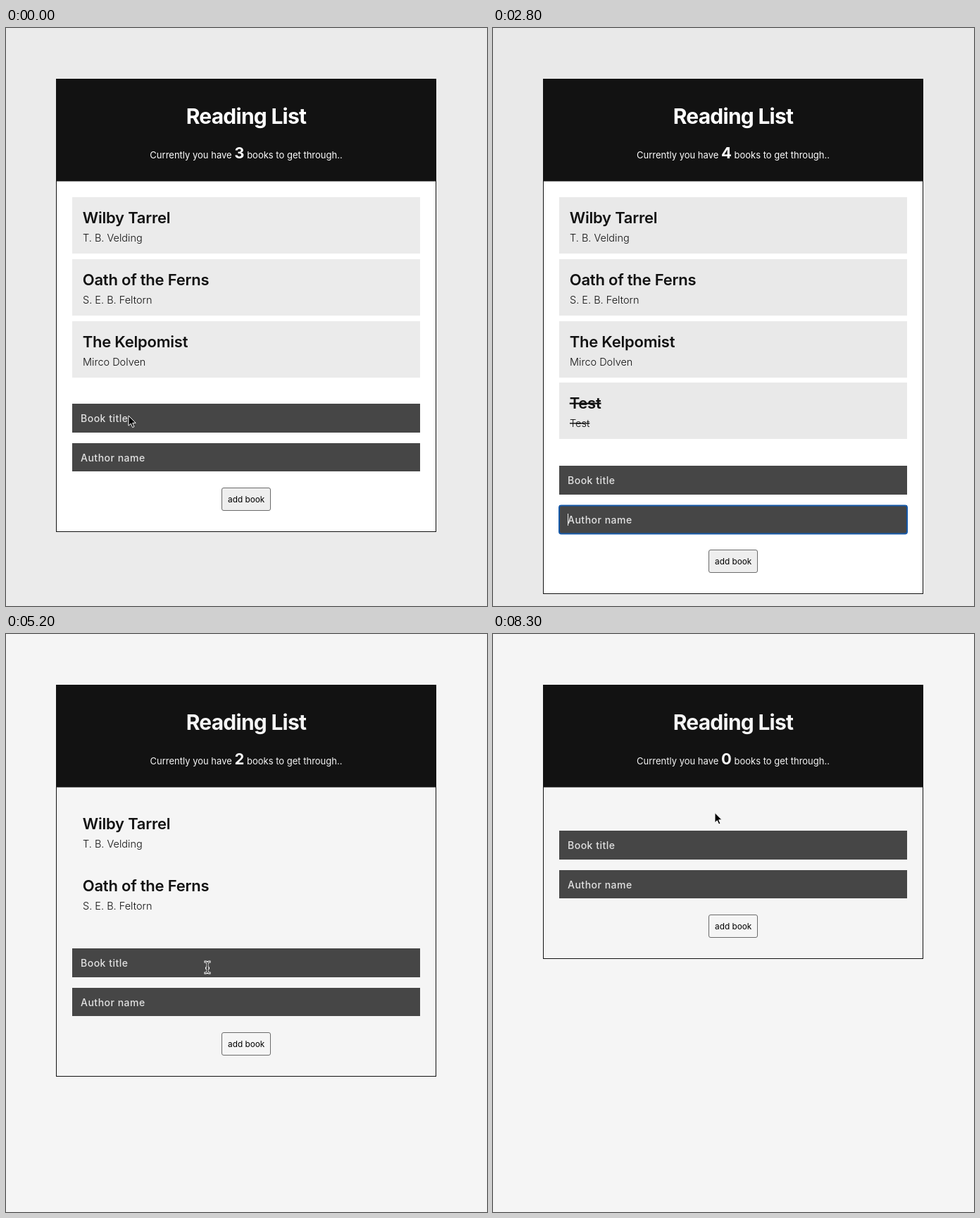
Animation of 683x820 px, one loop 8.4 s. Source, as an HTML page:

```html
<!DOCTYPE html>
<html lang="en">
<head>
<meta charset="utf-8">
<title>Reading List</title>
<style>
  html, body { margin: 0; width: 100%; height: 100%; overflow: hidden; }
  svg { display: block; width: 100%; height: 100%; font-family: Inter, "Liberation Sans", sans-serif; background: var(--page); }
  text { white-space: pre; }
  .paper { fill: var(--paper); stroke: #121212; }
  .head { fill: #121212; }
  .light { fill: var(--paper); text-anchor: middle; }
  .h1 { font-size: 30px; font-weight: 700; letter-spacing: -.75px; }
  .lead { font-size: 13px; }
  .count { font-size: 22px; font-weight: 700; }
  .card rect { fill: var(--page); }
  .title { font-size: 22px; font-weight: 600; letter-spacing: -.22px; fill: #111; }
  .author { font-size: 14.5px; font-weight: 300; fill: #111; }
  .hover text { text-decoration: line-through; }
  .field { fill: #464646; }
  .hint { font-size: 14px; font-weight: 500; letter-spacing: .5px; fill: #e2e2e2; }
  .typed { font-size: 14px; font-weight: 700; fill: #fff; }
  .focus { fill: none; stroke: #1659a8; stroke-width: 2; }
  .caret { fill: #eee; }
  .button { fill: var(--button); stroke: #6b6b6b; }
  .label { font-size: 11.8px; text-anchor: middle; }
  .ring { fill: none; stroke: #000; stroke-width: 2.6; }
</style>
</head>
<body>
<svg viewBox="0 0 683 820">
  <defs>
    <path id="bar" d="M-3-8Q0-8 0-6V6Q0 8-3 8M3-8Q0-8 0-6V6Q0 8 3 8M-1.5 1H1.5"/>
  </defs>
  <rect class="paper" id="box" x="71.5" y="72.5" width="539"/>
  <rect class="head" x="71" y="72" width="540" height="145.5"/>
  <text class="light h1" x="341" y="136">Reading List</text>
  <text class="light lead" x="341" y="184.5">Currently you have <tspan class="count" id="count">3</tspan> books to get through..</text>
  <g id="cards"></g>
  <g id="form">
    <rect class="field" x="94" width="494" height="41"/>
    <text id="in0" x="106" y="25.5"></text>
    <rect class="field" x="94" y="56" width="494" height="40"/>
    <text id="in1" x="106" y="81.5"></text>
    <rect class="focus" id="focus" x="94" width="494" height="40" rx="3"/>
    <rect class="caret" id="caret" width="1" height="17"/>
    <rect class="button" x="306.5" y="119.5" width="69" height="32" rx="2.5"/>
    <text class="label" x="341.2" y="139.5">add book</text>
  </g>
  <g id="pointer">
    <circle class="ring" id="ring" r="27"/>
    <path id="arrow" d="M0 0V14.2L3.3 11.2L5.7 16.6L8 15.6L5.7 10.3H10.2Z" stroke="#fff"/>
    <g id="beam" fill="none" stroke-linecap="square">
      <use href="#bar" stroke="#fff" stroke-width="3"/>
      <use href="#bar" stroke="#222"/>
    </g>
    <g id="hand" stroke="#000" stroke-linejoin="round">
      <path d="M-1 9L-3.6 6Q-4.2 4.3-2.4 4.6L-.7 6L-2.2 1Q-2.3-1-.8-.8Q.2-.6.5.8L1.5 4.2Q1.9 2.7 3.4 3.5L3.9 4.4Q4.7 3.1 5.9 4.4L6.3 5.1Q7.8 4.3 8.3 6L8.9 9.4Q9.2 11.8 8.3 14.6H1.6Q1 12 -1 9Z" fill="#fff"/>
      <path d="M3.2 9.3V12M5.2 9V12M7 8.7V11.7" stroke-width=".8"/>
    </g>
  </g>
</svg>
<script>
const LOOP = 8400, STEP = 100;
const FOCUS = 100, TAB = 1600, ADD = 2600, FADE = 5200;
const FIRST_CLICK = 4330, CLICK_GAP = 870, PRESS = 200;
const PITCH = 87.65;

const $ = id => document.getElementById(id);
const clamp = (v, lo, hi) => Math.min(hi, Math.max(lo, v));
const show = (el, on) => el.setAttribute("visibility", on ? "visible" : "hidden");
const inside = (y, top, height) => y >= top && y < top + height;

const books = [
  ["Wilby Tarrel", "T. B. Velding"],
  ["Oath of the Ferns", "S. E. B. Feltorn"],
  ["The Kelpomist", "Mirco Dolven"],
  ["Test", "Test"]
];
const hints = ["Book title", "Author name"];
// Where the pointer rests: the field, one spot per removed card, the exit.
const stops = [[174, 550], [264, 540], [286, 473], [283, 387], [290, 300], [315, 253.5]];

const clickAt = k => FIRST_CLICK + k * CLICK_GAP;
const cardTop = i => Math.round(240.3 + i * PITCH);
const formTop = n => n ? Math.round(270.3 + n * PITCH) : 279;

function bookCount(t) {
  const removed = clamp(Math.floor((t - FIRST_CLICK) / CLICK_GAP) + 1, 0, 4);
  return t < ADD ? 3 : 4 - removed;
}

function typed(i, t) {
  const keys = Math.floor((t - 700 - i * 1200) / 150) + 1;
  return t < ADD ? "test".slice(0, clamp(keys, 0, 4)) : "";
}

function focused(t) {
  if (t < FOCUS || t >= FIRST_CLICK - PRESS) return -1;
  return t < TAB ? 0 : 1;
}

function pressed(t) {
  const k = Math.floor((t + PRESS - FIRST_CLICK) / CLICK_GAP);
  return k >= 0 && k < 4 && t < clickAt(k);
}

function pointerAt(t) {
  let [x, y] = stops[0];
  for (let k = 0; k < stops.length - 1; k++) {
    const leave = k < 4 ? clickAt(k - 1) + 250 : 7650;
    const p = clamp((t - leave) / (k < 4 ? 380 : 650), 0, 1);
    const e = p * p * (3 - 2 * p);
    x += (stops[k + 1][0] - stops[k][0]) * e;
    y += (stops[k + 1][1] - stops[k][1]) * e;
  }
  return [x, y];
}

$("cards").innerHTML = books.map(([title, author], i) =>
  `<g class="card" transform="translate(0 ${cardTop(i)})">
    <rect x="94" width="494" height="80"/>
    <text class="title" x="108.7" y="36.7">${title}</text>
    <text class="author" x="109" y="62.5">${author}</text>
  </g>`).join("");
const cards = [...$("cards").children];
const style = document.querySelector("svg").style;

function draw(t) {
  const n = bookCount(t), top = formTop(n), focus = focused(t);
  const [x, y] = pointerAt(t);
  const faded = t >= FADE;
  const page = faded ? "#f5f5f5" : t < ADD ? "#ebebeb" : "#e9e9e9";
  style.setProperty("--page", page);
  style.setProperty("--paper", faded ? page : "#fff");
  style.setProperty("--button", faded ? page : "#eee");

  $("count").textContent = n;
  $("box").setAttribute("height", top + 109);
  $("form").setAttribute("transform", `translate(0 ${top})`);

  let onCard = false;
  cards.forEach((card, i) => {
    const over = i < n && inside(y, cardTop(i), 80);
    card.style.display = i < n ? "" : "none";
    card.classList.toggle("hover", over);
    onCard = onCard || over;
  });

  hints.forEach((hint, i) => {
    const word = typed(i, t), el = $("in" + i);
    el.textContent = word || hint;
    el.setAttribute("class", word ? "typed" : "hint");
  });

  show($("focus"), focus >= 0);
  show($("caret"), focus >= 0 && t % 1000 < 850);
  if (focus >= 0) {
    const width = typed(focus, t) ? $("in" + focus).getComputedTextLength() : 0;
    $("focus").setAttribute("y", focus * 56 + .5);
    $("caret").setAttribute("y", focus * 56 + 12);
    $("caret").setAttribute("x", Math.round(106 + width));
  }

  const onField = t >= FOCUS && (inside(y, top, 41) || inside(y, top + 56, 40));
  const visible = t < 500 || t >= 3200;
  $("pointer").setAttribute("transform", `translate(${x} ${y})`);
  show($("hand"), visible && onCard);
  show($("beam"), visible && onField);
  show($("arrow"), visible && !onCard && !onField);
  show($("ring"), pressed(t));
}

const start = performance.now();
function tick(now) {
  const t = Math.max(0, now - start) % LOOP;
  draw(Math.floor(t / STEP) * STEP);
  requestAnimationFrame(tick);
}
draw(0);
requestAnimationFrame(tick);
</script>
</body>
</html>
```
